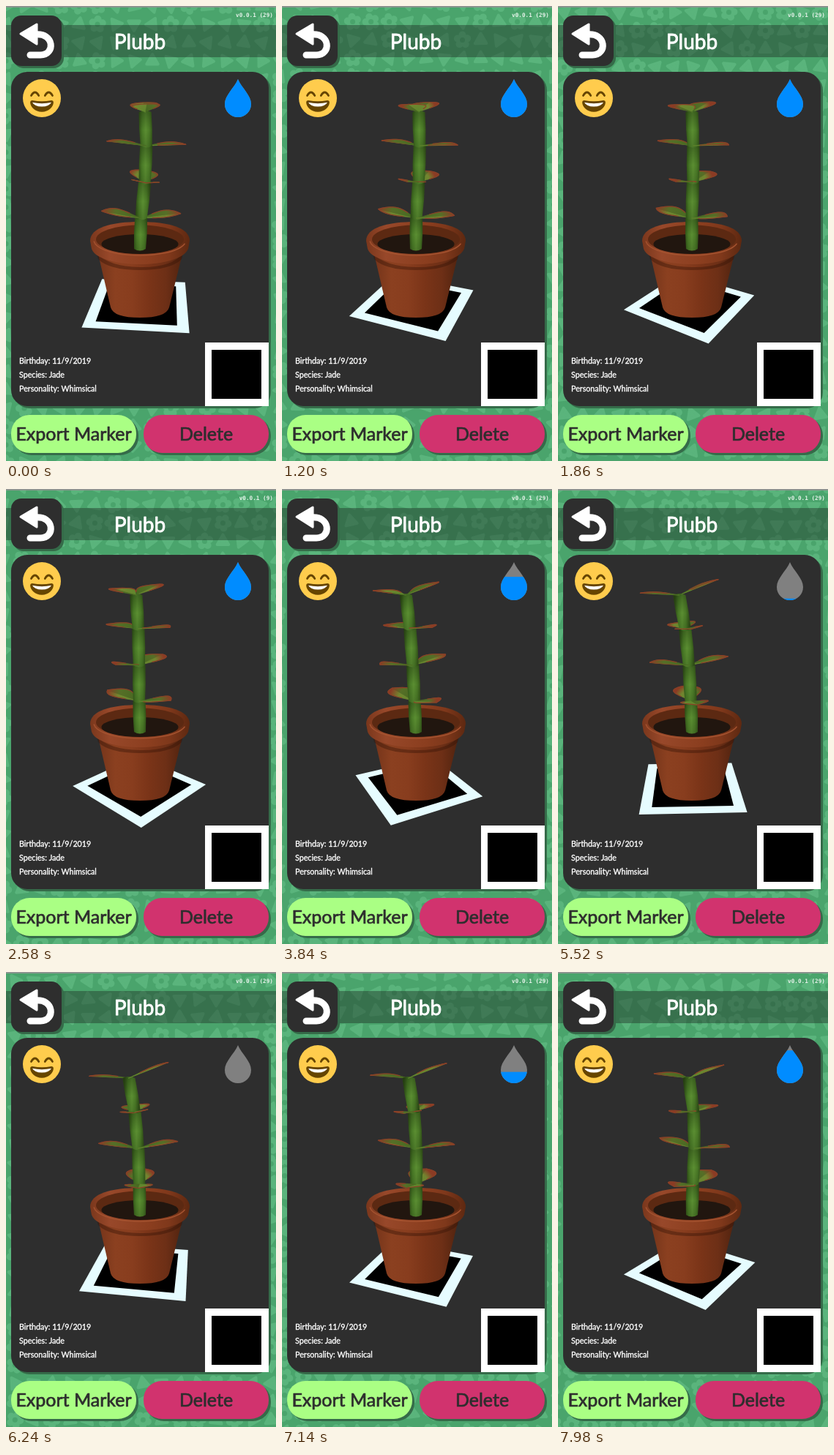
Write an HTML page with a canvas that moves like this. It is 369 px wide and 622 px high and loops after 8 s.

```html
<!DOCTYPE html>
<html lang="en">
<head>
<meta charset="utf-8">
<title>Plant card</title>
<style>
  html, body { margin: 0; width: 100%; height: 100%; overflow: hidden; background: #4ca76e; }
  canvas { display: block; width: 100vw; height: 100vh; }
</style>
</head>
<body>
<canvas></canvas>
<script>
const W = 369, H = 622, LOOP = 8000, STEP = 60;
const DARK = '#2e2e2e', SHADOW = '#356b49';
const canvas = document.querySelector('canvas');
const ctx = canvas.getContext('2d');
const dpr = window.devicePixelRatio || 1;
canvas.width = W * dpr;
canvas.height = H * dpr;

function fillPath(path, color) {
  ctx.fillStyle = color;
  ctx.fill(typeof path === 'string' ? new Path2D(path) : path);
}

function polygon(points, color) {
  const path = new Path2D();
  points.forEach(([x, y]) => path.lineTo(x, y));
  path.closePath();
  fillPath(path, color);
  return path;
}

function ellipse(x, y, rx, ry, color) {
  const path = new Path2D();
  path.ellipse(x, y, rx, ry, 0, 0, 2 * Math.PI);
  fillPath(path, color);
}

function gradient(x0, y0, x1, y1, colors) {
  const g = ctx.createLinearGradient(x0, y0, x1, y1);
  colors.forEach((c, i) => g.addColorStop(i / (colors.length - 1), c));
  return g;
}

function panel(x, y, w, h, r, color) {
  const box = (dx, fill) => {
    const path = new Path2D();
    path.roundRect(x + dx, y + dx, w, h, r);
    fillPath(path, fill);
  };
  box(3, SHADOW);
  box(0, color);
}

function text(str, x, y, font, color, align = 'left', weight = 0) {
  ctx.font = font;
  ctx.textAlign = align;
  ctx.fillStyle = ctx.strokeStyle = color;
  ctx.fillText(str, x, y);
  if (weight) {
    ctx.lineWidth = weight;
    ctx.strokeText(str, x, y);
  }
}

// Backdrop: a drifting field of rounded triangles and flowers
function hash(i, j) {
  const s = Math.sin(i * 127.1 + j * 311.7) * 43758.5453;
  return s - Math.floor(s);
}

function backdrop(t) {
  ctx.fillStyle = '#4aa46c';
  ctx.fillRect(0, 0, W, H);
  ctx.fillStyle = ctx.strokeStyle = '#5ab47c';
  ctx.lineJoin = 'round';
  ctx.lineWidth = 4;
  const cell = 25, shift = t * 18;
  const first = Math.floor(-shift / cell) - 1;
  for (let i = first; i * cell + shift < W + cell; i++) {
    for (let j = first; j * cell + shift < H + cell; j++) {
      const x = i * cell + shift, y = j * cell + shift;
      if (x > 30 && x < 335 && y > 115 && y < 525) continue;
      const turn = hash(i, j) * 6.28, flower = hash(j, i + 40) < 0.3;
      ctx.beginPath();
      if (flower) {
        for (let k = 0; k < 5; k++) {
          const a = turn + k * 1.2566;
          const px = x + 7 * Math.cos(a), py = y + 7 * Math.sin(a);
          ctx.moveTo(px, py);
          ctx.arc(px, py, 5, 0, 6.29);
        }
        ctx.fill();
        ellipse(x, y, 3.5, 3.5, '#4aa46c');
        ctx.fillStyle = '#5ab47c';
      } else {
        for (let k = 0; k < 3; k++) {
          const a = turn + k * 2.0944;
          ctx.lineTo(x + 9 * Math.cos(a), y + 9 * Math.sin(a));
        }
        ctx.closePath();
        ctx.fill();
        ctx.stroke();
      }
    }
  }
}

function header(t) {
  ctx.fillStyle = 'rgba(32,52,40,.45)';
  ctx.fillRect(0, 26, W, 44);
  ctx.fillStyle = '#8b958f';
  ctx.fillRect(0, 0, W, 2);
  panel(7, 13, 69, 69, 14, DARK);
  polygon([[19, 38], [43, 24], [43, 53]], '#fff');
  ctx.strokeStyle = '#fff';
  ctx.lineJoin = ctx.lineCap = 'round';
  ctx.lineWidth = 3;
  ctx.stroke(new Path2D('M20 38L42 25V52Z'));
  ctx.lineWidth = 9;
  ctx.stroke(new Path2D('M40 39C66 36 68 67 47 67H33'));
  text('Plubb', 183, 59, '28px Lato, sans-serif', '#fff', 'center', 0.8);
  const rate = t > 2.4 && t < 2.8 ? 9 : 29;
  text(`v0.0.1 (${rate})`, 365, 15, 'bold 7.7px "DejaVu Sans Mono", monospace', '#e6f2ea', 'right');
}

function smiley() {
  ctx.save();
  ctx.translate(23, 100);
  ctx.scale(52 / 36, 52 / 36);
  ellipse(18, 18, 18, 18, '#ffcc4d');
  fillPath('M18 21Q14 21 9 20Q7 20 7 22C7 26 11.6 31 18 31S29 26 29 22Q29 20 27 20Q22 21 18 21Z', '#664500');
  fillPath('M9 22Q18 24 27 22Q25 26 18 26T9 22Z', '#fff');
  ctx.strokeStyle = '#664500';
  ctx.lineWidth = 2;
  ctx.stroke(new Path2D('M8 15.5Q11.5 9.5 15 15.5M21 15.5Q24.5 9.5 28 15.5'));
  ctx.restore();
}

function waterDrop(t) {
  const level = t < 6.7 ? Math.min(152, 120 + 17.7 * (t - 3.84)) : 152 - 35 * (t - 6.7);
  ctx.save();
  ctx.clip(new Path2D('M317 100C322 112 335 122 335 134A18 18 0 0 1 299 134C299 122 312 112 317 100Z'));
  ctx.fillStyle = '#808080';
  ctx.fillRect(299, 100, 36, 52);
  ctx.fillStyle = '#008cff';
  ctx.fillRect(299, Math.max(100, level), 36, 60);
  ctx.restore();
}

// Square plate on the floor, seen in perspective
function floorPlate(t) {
  const start = (50 + 15.05 * t) * Math.PI / 180;
  const square = r => [0, 1, 2, 3].map(i => {
    const a = start + i * Math.PI / 2;
    const depth = r * Math.sin(a), scale = 1 / (1 - 0.185 * depth);
    return [182.5 + 91 * r * Math.cos(a) * scale, 405 + 47.3 * depth * scale];
  });
  polygon(square(1), '#e6fcff');
  polygon(square(0.78), '#000');
}

function pot() {
  const body = gradient(126, 0, 242, 0, ['#74341a', '#8b4020', '#883d1e', '#7a3418', '#6d2f16', '#50230f']);
  fillPath('M125 335L143 412Q147 426 183 426T223 412L242 335Z', body);
  fillPath('M124 338Q140 356 183 357T242 338L240 346Q225 361 183 361T126 346Z', 'rgba(50,18,5,.4)');
  const rim = gradient(115, 0, 250, 0, ['#7a371c', '#98482a', '#914324', '#8b3e1f', '#7f381b', '#5f2911']);
  fillPath('M115 321C115 303 144 295 183 295S251 303 251 321L249 332C243 346 214 353 183 353S122 346 117 332Z', rim);
  ellipse(183, 319, 60, 19.5, '#5c2912');
  ellipse(183, 325.5, 52.5, 13.5, '#21160f');
  ctx.strokeStyle = '#a4522f';
  ctx.lineWidth = 1.5;
  ctx.beginPath();
  ctx.ellipse(183, 320, 63, 21, 0, 0.25, Math.PI - 0.1);
  ctx.stroke();
}

// Stem joints sway; each carries a pair of leaves crossed with its neighbours
const joints = [
  { y: 290, mid: 183,   amp: 2,    peak: 4.3, tilt: 0.25, lift: 8 },
  { y: 241, mid: 184,   amp: 6,    peak: 4.6, tilt: 0.16, lift: 8 },
  { y: 191, mid: 182.5, amp: 9.5,  peak: 4.9, tilt: 0.1,  lift: 4 },
  { y: 145, mid: 177.8, amp: 12.3, peak: 5.2, tilt: 0.02, lift: 12 }
];

function leaf(joint, angle, lean) {
  const LENGTH = 54, HALF = 19, N = 14;
  const c = Math.cos(angle), s = Math.sin(angle);
  const point = (u, side) => {
    const along = LENGTH * u;
    const across = side * HALF * Math.sin(Math.PI * u ** 1.35) ** 0.9;
    const dx = along * c - across * s, dz = along * s + across * c;
    const lift = joint.lift * u + Math.abs(across) * 0.12;
    return [joint.x + dx, joint.y + joint.tilt * dz - lift + lean * dx];
  };
  const edge = side => Array.from({ length: N + 1 }, (_, i) => point(Math.min(i / N, 0.999), side));
  const tip = point(0.999, 0);
  const reach = Math.max(24, Math.hypot(tip[0] - joint.x, tip[1] - joint.y));
  for (const side of [-1, 1]) {
    const g = ctx.createRadialGradient(joint.x, joint.y, 0, joint.x, joint.y, reach);
    const lit = side * c > 0;
    g.addColorStop(0, lit ? '#5e872d' : '#456820');
    g.addColorStop(0.65, lit ? '#72852f' : '#566f27');
    g.addColorStop(1, '#8b3b24');
    const path = polygon([...edge(side), ...edge(0).reverse()], g);
    ctx.strokeStyle = g;
    ctx.lineWidth = 0.7;
    ctx.stroke(path);
    const rim = new Path2D();
    edge(side).slice(4).forEach(([x, y]) => rim.lineTo(x, y));
    ctx.strokeStyle = '#8b4027';
    ctx.lineWidth = 1.2;
    ctx.stroke(rim);
  }
}

function stemSegment(a, b) {
  const mx = (a.x + b.x) / 2, my = (a.y + b.y) / 2;
  const path = `M${a.x - 8} ${a.y}Q${mx - 9.5} ${my} ${b.x - 8.5} ${b.y}`
    + `Q${b.x} ${b.y - 4} ${b.x + 8.5} ${b.y}Q${mx + 9.5} ${my} ${a.x + 8} ${a.y}`
    + `Q${a.x} ${a.y + 5} ${a.x - 8} ${a.y}Z`;
  fillPath(path, gradient(mx - 10, my, mx + 10, my, ['#2c4a15', '#497a26', '#5b8e32', '#4b7b27', '#2f4c17']));
  fillPath(path, gradient(0, b.y, 0, a.y + 3, ['rgba(20,35,8,.35)', 'rgba(20,35,8,0)', 'rgba(20,35,8,.2)']));
}

function plant(t) {
  const spin = (15.05 * t - 2) * Math.PI / 180;
  const chain = [{ x: 183, y: 332 }];
  for (const j of joints) chain.push({ ...j, x: j.mid - j.amp * Math.cos(0.6 * (t - j.peak)) });
  const leaves = [];
  chain.slice(1).forEach((joint, i) => {
    const below = chain[i];
    const lean = (joint.x - below.x) / (below.y - joint.y);
    for (const half of [0, Math.PI]) {
      leaves.push({ joint, lean, angle: spin + half + (i % 2) * Math.PI / 2 });
    }
  });
  const drawLeaves = front => leaves
    .filter(l => Math.sin(l.angle) > 0 === front)
    .forEach(l => leaf(l.joint, l.angle, l.lean));
  drawLeaves(false);
  for (let i = 1; i < chain.length; i++) stemSegment(chain[i - 1], chain[i]);
  drawLeaves(true);
}

function card(t) {
  panel(7, 90, 352, 457, 22, DARK);
  floorPlate(t);
  pot();
  plant(t);
  smiley();
  waterDrop(t);
  ['Birthday: 11/9/2019', 'Species: Jade', 'Personality: Whimsical'].forEach((line, i) =>
    text(line, 18, 488.5 + i * 19.3, '10.7px Lato, sans-serif', '#fff', 'left', 0.35));
  ctx.fillStyle = '#fff';
  ctx.fillRect(272, 460, 87, 87);
  ctx.fillStyle = '#000';
  ctx.fillRect(281, 470, 68, 67);
}

function buttons() {
  const button = (x, color, label) => {
    panel(x, 559, 171, 52, 25, color);
    text(label, x + 85.5, 594, '25px Lato, sans-serif', DARK, 'center', 0.7);
  };
  button(7, '#aaff84', 'Export Marker');
  button(188, '#d1336e', 'Delete');
}

function frame(now) {
  const t = Math.floor((now % LOOP) / STEP) * STEP / 1000;
  ctx.setTransform(dpr, 0, 0, dpr, 0, 0);
  backdrop(t);
  header(t);
  card(t);
  buttons();
  requestAnimationFrame(frame);
}
const origin = performance.now();
frame(0);
function frameClock() { return performance.now() - origin; }
</script>
</body>
</html>
```
